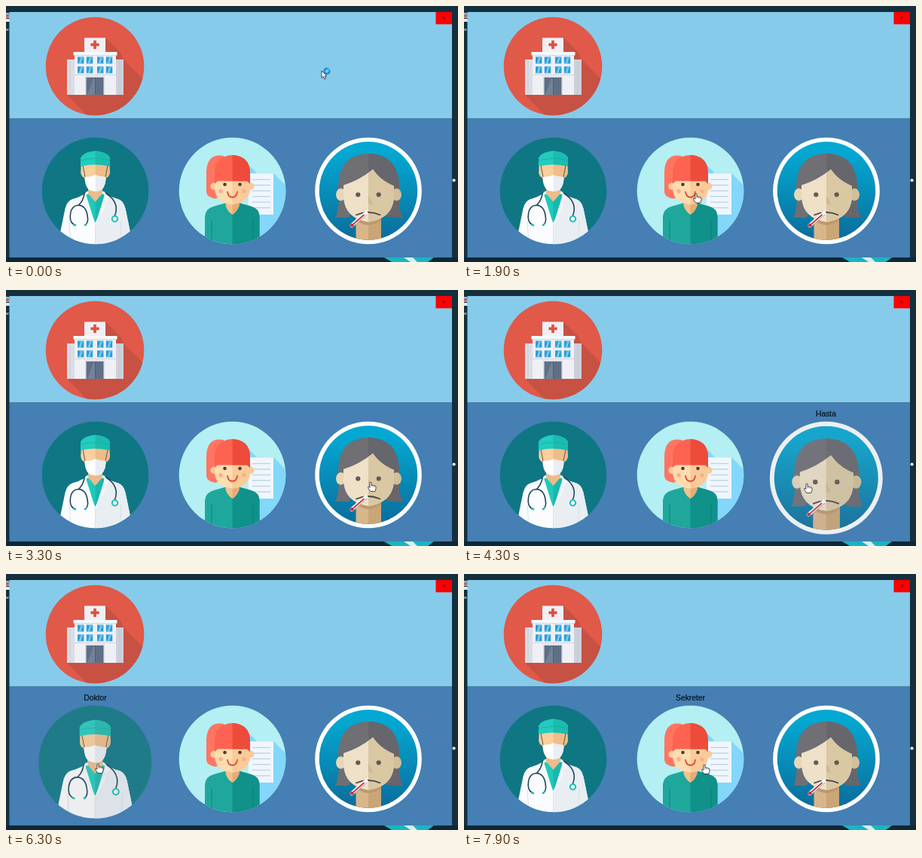
These frames come from a looping animation (600 by 340 pixels, 8000 ms). An HTML page:

```html
<!DOCTYPE html>
<html lang="tr">
<head>
<meta charset="utf-8">
<title>Hastane</title>
<style>
html, body { margin: 0; width: 100%; height: 100%; overflow: hidden; background: #15303c; }
svg { display: block; width: 600px; height: 340px; }
text { font-family: "Liberation Sans", Arial, sans-serif; }
.label { font-size: 10.3px; text-anchor: middle; fill: #08121c; stroke: #08121c; stroke-width: .2; }
.veil { fill: #8c96a0; opacity: 0; }
.hover .veil { opacity: .14; }
</style>
</head>
<body>
<svg viewBox="0 0 600 340">
  <defs>
    <clipPath id="clipHospital"><circle cx="118" cy="80" r="65.3"/></clipPath>
    <clipPath id="clipDoctor"><circle cx="118.5" cy="245.5" r="70.8"/></clipPath>
    <clipPath id="clipSecretary"><circle cx="300.5" cy="245.5" r="70.8"/></clipPath>
    <clipPath id="clipPatient"><circle cx="481" cy="245.5" r="65.2"/></clipPath>
    <clipPath id="rightDoctor"><rect x="118.5" y="170" width="80" height="150"/></clipPath>
    <clipPath id="rightSecretary"><rect x="300.5" y="170" width="80" height="150"/></clipPath>
    <linearGradient id="sea" x2="0" y2="1">
      <stop offset=".1" stop-color="#04a8d2"/><stop offset="1" stop-color="#0a6c9a"/>
    </linearGradient>
    <g id="pane">
      <rect width="8.4" height="9" fill="#2b9fd8"/>
      <path d="M1 9L6 0H8L3 9Z" fill="#71c5ee"/>
      <path d="M4.2 0V9" stroke="#d7edf8" stroke-width=".6"/>
    </g>
  </defs>

  <!-- desktop edges -->
  <rect width="600" height="340" fill="#15303c"/>
  <rect y="334" width="600" height="6" fill="#0c2735"/>
  <path d="M502 334H568L560 340H512Z" fill="#18b5c3"/>
  <path d="M528 334L537 340H546L540 334Z" fill="#d5f1f2"/>
  <path d="M0 9H4L5 13V16H0Z" fill="#86c5e3"/>
  <circle cx="2" cy="13" r="2" fill="#d94f4c"/>
  <rect y="17" width="5" height="4" fill="#dbe9ef"/>
  <text x="-1" y="33" font-size="6" fill="#e6edf0">ar</text>
  <circle cx="594.6" cy="231.5" r="2.1" fill="#f2f7f8"/>

  <!-- window -->
  <rect x="4.5" y="8" width="587.5" height="141.5" fill="#87cbea"/>
  <rect x="4.5" y="149.3" width="587.5" height="184.7" fill="#457fb3"/>
  <rect x="570.5" y="8" width="21.5" height="16.3" fill="#fe0000"/>
  <path d="M579.3 14L583 17.8M583 14L579.3 17.8" stroke="#640808" stroke-width=".9"/>

  <!-- hospital -->
  <g clip-path="url(#clipHospital)">
    <rect x="50" y="12" width="136" height="136" fill="#e05949"/>
    <path d="M132 42L152 62L156 71L200 115V160H122L81 118Z" fill="#c75143"/>
    <rect x="81" y="71" width="10" height="47" fill="#dadde5"/>
    <rect x="146" y="71" width="10" height="47" fill="#cdd0da"/>
    <path d="M85 71V118M151 71V118" stroke="#bfc4d0" stroke-width=".7"/>
    <rect x="91" y="64" width="55" height="54" fill="#eff0f5"/>
    <rect x="104" y="42.3" width="28" height="20" fill="#eff0f5"/>
    <rect x="89.5" y="61" width="58" height="4.4" fill="#f7f8fa"/>
    <path d="M90 65.6H147M91 91.5H146" stroke="#cfd3dc" stroke-width=".9"/>
    <path d="M118 45.8V57M112.4 51.4H123.6" stroke="#e0503f" stroke-width="3.7"/>
    <g id="panes"></g>
    <rect x="105.3" y="93.6" width="25.4" height="24.4" fill="#cfd4dd"/>
    <rect x="106.6" y="95" width="22.8" height="23" fill="#5e6f86"/>
    <path d="M118 95V118" stroke="#3f4d62" stroke-width="1"/>
    <path d="M108 118L116 96H118V118Z" fill="#71829a"/>
  </g>

  <!-- doctor -->
  <g id="doctor"><g clip-path="url(#clipDoctor)">
    <rect x="47" y="174" width="143" height="143" fill="#0e7783"/>
    <path id="coat" d="M108 246Q104 252 88 256.500Q81 259 78.500 269L68 320H169L158.500 269Q156 259 149 256.500Q133 252 129 246Z" fill="#fbfcfd"/>
    <path d="M118.500 246H129Q133 252 149 256.500Q156 259 158.500 269L169 320H118.500Z" fill="#e9eef3"/>
    <path d="M106 250L118.500 290L131 250Z" fill="#1fcabb"/>
    <path d="M118.500 290L131 250H118.500Z" fill="#18b8ab"/>
    <path d="M109 236H128V249L118.500 260L109 249Z" fill="#eebb8a"/>
    <path d="M107 246L100 256L107 261L105 266L118.500 291L132 266L130 261L137 256L130 246L131 261L118.500 288L106 261Z" fill="#f4f7fa"/>
    <path d="M118.500 290V317" stroke="#d4dce4" stroke-width=".8"/>
    <path d="M84 285L86 317M153 285L151 317" stroke="#d5dde4" stroke-width=".9"/>
    <path d="M99.500 216Q98 226 104 228Q106 244 118.500 246Q131 244 133 228Q139 226 137.500 216V209H99.500Z" fill="#f9cf9c"/>
    <path d="M118.500 209H137.500V216Q139 226 133 228Q131 244 118.500 246Z" fill="#efbd89"/>
    <path d="M102 212L105 227M135 212L132 227" stroke="#4a4b4b" stroke-width=".9"/>
    <path d="M105 227Q112 227 118.500 224.500Q125 227 132 227Q133 238 127 244Q118.500 248.500 110 244Q104 238 105 227Z" fill="#fff"/>
    <path d="M118.500 224.500Q125 227 132 227Q133 238 127 244Q123 246.500 118.500 246.500Z" fill="#e8eef3"/>
    <path d="M99 213V202Q102 194 118.500 192.500Q135 194 138 202V213Q118.500 208 99 213Z" fill="#22ccbe"/>
    <path clip-path="url(#rightDoctor)" d="M99 213V202Q102 194 118.500 192.500Q135 194 138 202V213Q118.500 208 99 213Z" fill="#1bbcaf"/>
    <path d="M99.500 205Q118.500 200 137.500 205" fill="none" stroke="#19ab9f" stroke-width=".7"/>
    <g fill="none" stroke="#20445a" stroke-width="1.600" stroke-linecap="round">
      <path d="M104 249Q103 258 97 264"/>
      <path d="M90 290Q84 287 85.500 276Q87 265 96 264.500Q106 265 108 278Q110 288 105 291"/>
      <path d="M133 249Q144 256 146 266Q147 273 144.500 278"/>
    </g>
    <path d="M89 290L93 291.500M104 291.500L107 290" stroke="#20b9b0" stroke-width="2.500"/>
    <circle cx="144.500" cy="282.800" r="3.700" fill="#eef5f6" stroke="#1dbdb3" stroke-width="2"/>
  </g><circle class="veil" cx="118.500" cy="245.500" r="70.800"/></g>

  <!-- secretary -->
  <g id="secretary"><g clip-path="url(#clipSecretary)">
    <rect x="229" y="174" width="143" height="143" fill="#b4eff3"/>
    <path d="M320 209L333 222H355L373 240V318H336L322 277Z" fill="#83d7fa"/>
    <rect x="321.500" y="222.300" width="33.500" height="54.700" fill="#f1f6fd"/>
    <path id="lines" stroke="#c0d5e9" stroke-width="1.700"/>
    <path d="M289 199Q267 195 266 220V247Q267 255 279 256L290 245Z" fill="#ff7561"/>
    <path d="M264 320V279Q265 269 276 266L292 261.500H309L325 266Q336 269 336.500 279V320Z" fill="#20a79b"/>
    <path d="M300.500 261.500H309L325 266Q336 269 336.500 279V320H300.500Z" fill="#10918a"/>
    <path d="M273 284V317M328 284V317" stroke="#087d77" stroke-width=".8"/>
    <path d="M291.500 256H309.500V265Q307 273 300.500 277Q294 273 291.500 265Z" fill="#f2c28e"/>
    <path d="M300.500 256H309.500V265Q307 273 300.500 277Z" fill="#e5ac78"/>
    <g fill="#f8cb99"><circle cx="276" cy="239.500" r="4.700"/><circle cx="325" cy="239.500" r="4.700"/></g>
    <path id="face" d="M277 218H324V242Q323 262 300.500 263.500Q278 262 277 242Z" fill="#fddcb0"/>
    <path clip-path="url(#rightSecretary)" d="M277 218H324V242Q323 262 300.500 263.500Q278 262 277 242Z" fill="#f8cb99"/>
    <path d="M277 236V219Q279 199 300.500 198Q322 199 324 219V236L320 232.500H281Z" fill="#fd6350"/>
    <path d="M300.500 198Q322 199 324 219V236L320 232.500H300.500Z" fill="#ed4c3a"/>
    <g fill="#513a32"><circle cx="290.500" cy="237" r="2.300"/><circle cx="310.500" cy="237" r="2.300"/></g>
    <g fill="#fbae8c"><circle cx="285" cy="246" r="2.700"/><circle cx="316" cy="246" r="2.700"/></g>
    <path d="M294 247Q295 254 300.500 254Q306 254 307 247" fill="none" stroke="#e24d3d" stroke-width="1.800" stroke-linecap="round"/>
  </g><circle class="veil" cx="300.500" cy="245.500" r="70.800"/></g>

  <!-- patient -->
  <g id="patient"><circle cx="481" cy="245.500" r="70.800" fill="#fdfefe"/><g clip-path="url(#clipPatient)">
    <rect x="415" y="180" width="132" height="132" fill="url(#sea)"/>
    <path d="M437 281Q443 270 441 247Q439 197 481 196Q524 197 522 247Q520 270 527 281H508L500 262H463L455 281Z" fill="#6f6f74"/>
    <path d="M481 196Q524 197 522 247Q520 270 527 281H508L481 262Z" fill="#66666c"/>
    <path d="M464.500 275H498V315H464.500Z" fill="#d8b68a"/>
    <path d="M481 275H498V315H481Z" fill="#c9a577"/>
    <path d="M464.500 277Q481 296 498 277V284Q481 298 464.500 284Z" fill="#bd996d"/>
    <ellipse cx="444.500" cy="250.500" rx="6.500" ry="8.300" fill="#e7d7b8"/>
    <ellipse cx="518.500" cy="250.500" rx="6.500" ry="8.300" fill="#d3bf99"/>
    <path d="M448 238Q468 232 487 217Q497 232 515 239V253Q514 282 481 287Q449 282 448 253Z" fill="#eee1c7"/>
    <path d="M481 222L487 217Q497 232 515 239V253Q514 282 481 287Z" fill="#dac8a3"/>
    <path d="M481 251V263H487Z" fill="#cdb98f"/>
    <g fill="#625a55"><circle cx="467.300" cy="250.500" r="3.100"/><circle cx="494.700" cy="250.500" r="3.100"/></g>
    <path d="M465 277.500Q481 270.500 496.500 277.500" fill="none" stroke="#4b4745" stroke-width="1.800" stroke-linecap="round"/>
    <g stroke-linecap="round">
      <path d="M459 291.500L478 275" stroke="#fff" stroke-width="5"/>
      <path d="M459 291.500L475 277.500" stroke="#c23542" stroke-width="1.800"/>
      <path d="M462 292L479 277" stroke="#806a77" stroke-width=".7"/>
    </g>
    <circle cx="459.200" cy="291.300" r="2.300" fill="#c92b39"/>
  </g><circle class="veil" cx="481" cy="245.500" r="70.800"/></g>

  <text class="label" id="doctorLabel" x="118.5" y="168.400">Doktor</text>
  <text class="label" id="secretaryLabel" x="300.500" y="168">Sekreter</text>
  <text class="label" id="patientLabel" x="480.500" y="168.400">Hasta</text>

  <!-- pointers, tip at the origin -->
  <g id="arrow">
    <path d="M0 0V9.500L2.200 7.500L3.800 11L5.500 10.200L4 6.900H6.800Z" fill="#fff" stroke="#222" stroke-width=".8"/>
    <g id="busy">
      <circle cx="7" cy="0.500" r="3.500" fill="#7cc9ef" stroke="#168bd0" stroke-width="2.300"/>
      <path d="M7 -3A3.500 3.500 0 0 1 10.500 .5" fill="none" stroke="#55b8ec" stroke-width="1.600"/>
    </g>
  </g>
  <g id="hand">
    <path d="M-1.100 .8Q0 -.7 1.100 .8V4.300Q2.300 3.400 3.200 4.600Q4.500 3.900 5.300 5.100Q6.800 4.700 7 6.300V9L5.800 12.500H-.3L-3.400 7.800Q-3.800 6 -2 6.400L-1.100 7.500Z" fill="#fff" stroke="#222" stroke-width=".8"/>
    <path d="M1.100 4.300V6.500M3.200 4.600V6.700M5.300 5.100V7" stroke="#555" stroke-width=".6"/>
  </g>
</svg>
<script>
const LOOP = 8000, STEP = 100, ZOOM = 1.058;
const $ = id => document.getElementById(id);

// centre x and [from, to] spans for the zoom and the label
const people = {
  doctor: { x: 118.5, zoom: [[800, 1600], [5200, 6500]] },
  secretary: { x: 300.5, zoom: [[2000, 2800], [6800, 7800]], label: [[2000, 2800], [6800, 8000]] },
  patient: { x: 481, zoom: [[3400, 4700]] }
};

// time, x, y of the pointer tip
const path = [
  [0, 419, 86], [200, 416, 90], [700, 122, 250], [1400, 118, 252],
  [1800, 306, 250], [1900, 308, 249], [2700, 318, 252], [3100, 482, 254],
  [3300, 484, 255], [3800, 478, 258], [4300, 455, 257], [4600, 452, 257],
  [5100, 118, 252], [5500, 115, 250], [6300, 122, 252], [6700, 317, 253],
  [7000, 319, 253], [8000, 319, 253]
];

$("panes").innerHTML = [67.5, 80.3].map(y =>
  [95, 106.8, 121, 132.8].map(x => `<use href="#pane" x="${x}" y="${y}"/>`).join("")).join("");
$("lines").setAttribute("d", [230.5, 238, 245.5, 253, 260.5, 268].map(y => `M327 ${y}H351`).join(""));

const within = (spans, t) => spans.some(([from, to]) => t >= from && t < to);
const show = (id, on) => { $(id).style.display = on ? "" : "none"; };

function pointerAt(t) {
  const i = path.findIndex(p => p[0] > t);
  const [t0, x0, y0] = path[i - 1], [t1, x1, y1] = path[i];
  const u = (t - t0) / (t1 - t0), k = u * u * (3 - 2 * u);
  return [x0 + (x1 - x0) * k, y0 + (y1 - y0) * k];
}

function draw(t) {
  const [x, y] = pointerAt(t);
  let over = false;
  for (const [id, p] of Object.entries(people)) {
    const zoomed = within(p.zoom, t);
    const el = $(id);
    el.setAttribute("class", zoomed ? "hover" : "");
    el.setAttribute("transform", zoomed
      ? `translate(${p.x - .2} 249.7) scale(${ZOOM}) translate(${-p.x} -245.5)` : "");
    show(id + "Label", within(p.label || p.zoom, t));
    over = over || Math.hypot(x - p.x, y - 245.5) < 71;
  }
  show("hand", over);
  show("arrow", !over);
  show("busy", t < 400);
  for (const id of ["hand", "arrow"]) $(id).setAttribute("transform", `translate(${x} ${y})`);
}

const start = performance.now();
function tick() {
  const t = (performance.now() - start) % LOOP;
  draw(Math.floor(t / STEP) * STEP);
  requestAnimationFrame(tick);
}
tick();
</script>
</body>
</html>
```
